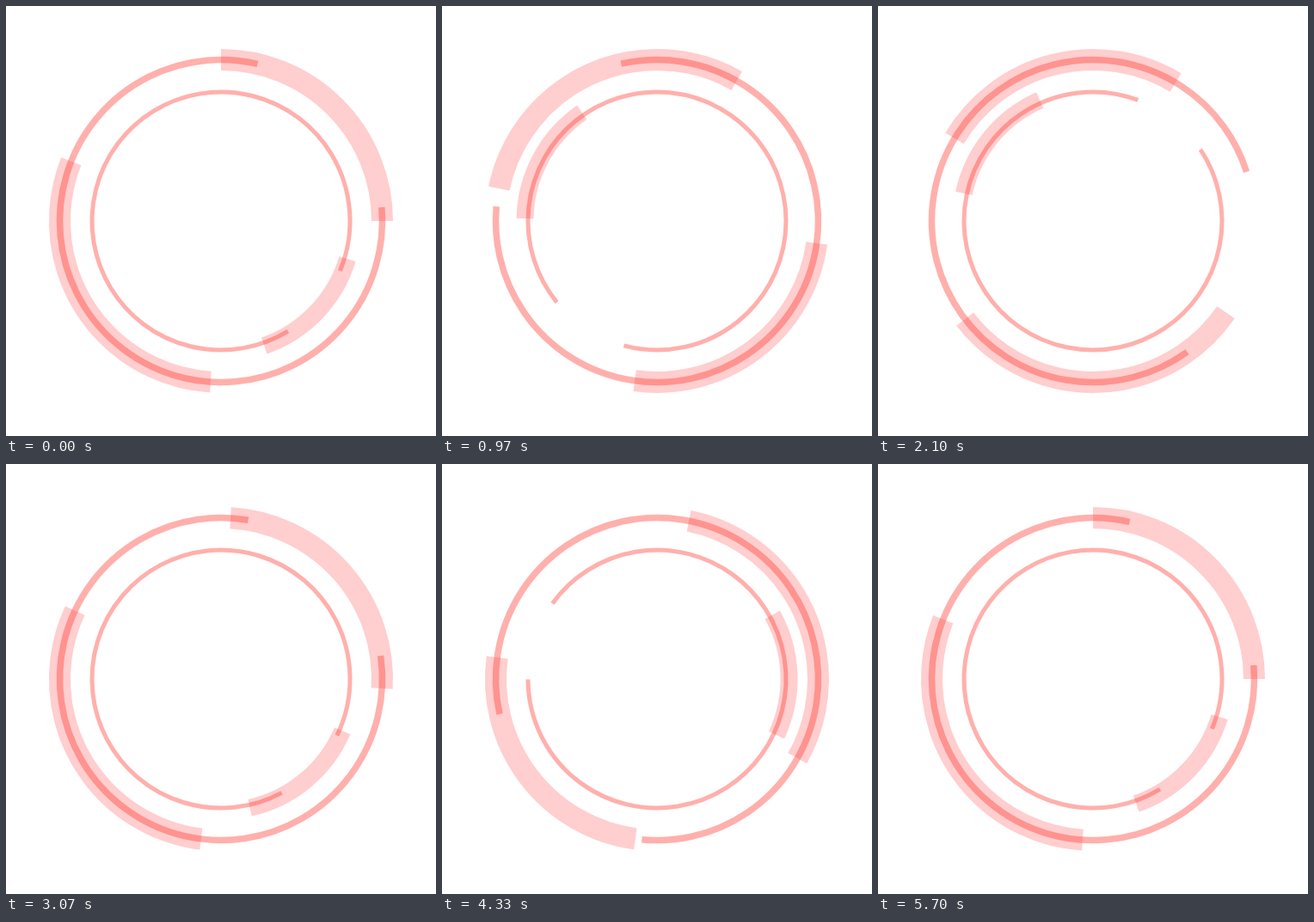
Animation of 500x500 px, one loop 5.73 s. Source, as an HTML page with a canvas:

```html
<!DOCTYPE html>
<html lang="en">
<head>
<meta charset="utf-8">
<title>Ring loader</title>
<style>
  html, body { margin: 0; width: 100%; height: 100%; overflow: hidden; background: #fff; }
  canvas { display: block; width: 500px; height: 500px; }
</style>
</head>
<body>
<canvas id="stage" width="500" height="500"></canvas>
<script>
const ctx = document.getElementById('stage').getContext('2d');
const LOOP = 5730;      // ms, two turns
const STEP = 80;        // ms of motion per pose
const POSES = 36;       // poses per turn, first and last coincide

const BAND = 'rgba(255, 60, 60, 0.25)';
const LINE = 'rgba(255, 59, 48, 0.4)';

// Angles in degrees, clockwise from the right
const RINGS = [
  { r: 187.5, w: 25,  color: BAND, turn: 360,  ease: 2 / 3, arcs: [[270, 90], [93.7, 108]] },
  { r: 187.5, w: 7.5, color: LINE, turn: -360, ease: 2 / 3, arcs: [[355.1, 288]] },
  { r: 153.5, w: 20,  color: BAND, turn: 720,  ease: 5 / 6, arcs: [[16.7, 54.2]] },
  { r: 150,   w: 5,   color: LINE, turn: 360,  ease: 5 / 6, arcs: [[58.7, 324]] }
];

// cubic-bezier(1/3, 0, c, 1), solved by bisection
function ease(x, c) {
  let lo = 0, hi = 1;
  for (let i = 0; i < 40; i++) {
    const s = (lo + hi) / 2, q = 1 - s;
    if (s * q * q + 3 * c * s * s * q + s * s * s < x) lo = s; else hi = s;
  }
  return lo * lo * (3 - 2 * lo);
}

// Poses appear on the next tick of a 30 Hz clock, in whole centiseconds
function poseStart(k) {
  return Math.round(Math.ceil(k * 12 / 5) * 10 / 3) * 10;
}

function poseAt(t) {
  const k = Math.floor(t / STEP);
  return t < poseStart(k) ? k - 1 : k;
}

function draw(t) {
  const x = (poseAt(t) % POSES) / (POSES - 1);
  const rad = Math.PI / 180;
  ctx.fillStyle = '#fff';
  ctx.fillRect(0, 0, 500, 500);
  for (const ring of RINGS) {
    const shift = ring.turn * ease(x, ring.ease);
    ctx.strokeStyle = ring.color;
    ctx.lineWidth = ring.w;
    for (const [from, span] of ring.arcs) {
      const a = (from + shift) * rad;
      ctx.beginPath();
      ctx.arc(250, 250, ring.r, a, a + span * rad);
      ctx.stroke();
    }
  }
}

const begin = performance.now();
function tick() {
  draw((performance.now() - begin) % LOOP);
  requestAnimationFrame(tick);
}
tick();
</script>
</body>
</html>
```
